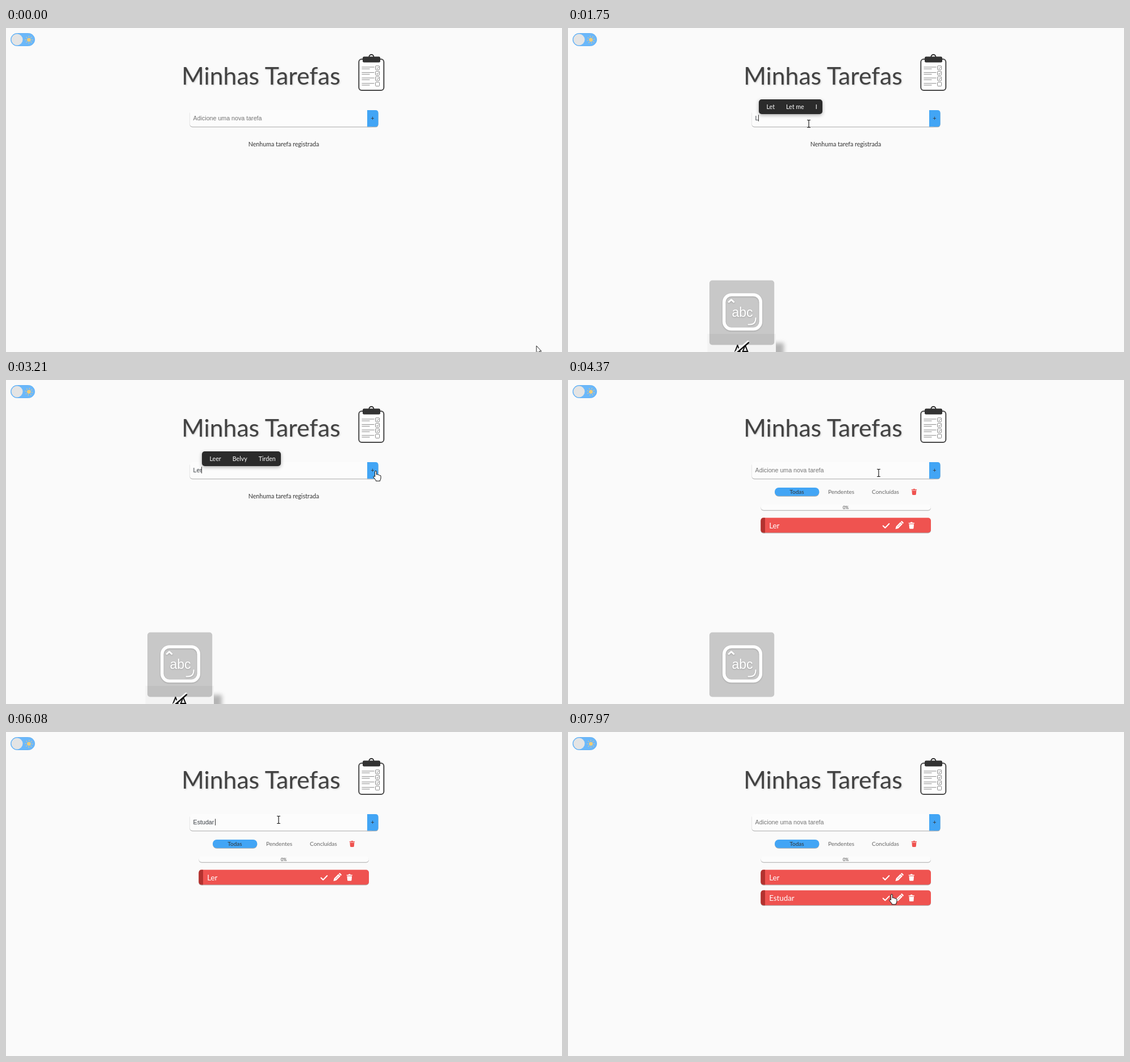
An HTML page that plays this animation: 979 by 572 pixels, repeating every 8000 ms.

```html
<!DOCTYPE html>
<html lang="pt">
<head>
<meta charset="utf-8">
<title>Minhas Tarefas</title>
<style>
  html, body { margin: 0; width: 100%; height: 100%; overflow: hidden; background: #fafafa; }
  svg { position: absolute; left: 0; top: 0; font-family: Lato, sans-serif; }
  .mid { text-anchor: middle; }
  .soft { filter: drop-shadow(.4px 1px .7px rgba(0,0,0,.32)); }
  .field { font: 10.67px "Liberation Sans", Arial, sans-serif; white-space: pre; }
  .tab { font-size: 10px; fill: #666; text-anchor: middle; }
  .name { font-size: 13.33px; fill: #fff; }
  .line { fill: none; stroke-linecap: round; stroke-linejoin: round; }
  #popup {
    position: absolute; top: 125.5px; height: 26px; padding: 0 9.5px 0 14px; border-radius: 5px;
    display: flex; gap: 20px; align-items: center; white-space: nowrap;
    background: #2b2b2b; color: #fff; font: 10.67px Lato, sans-serif;
    box-shadow: 0 2px 6px rgba(0,0,0,.32);
  }
</style>
</head>
<body>
<svg width="979" height="572" viewBox="0 0 979 572">
  <defs>
    <g id="trash">
      <path d="M-5-4.7h3l.8-1.3h2.4l.8 1.3h3v1.5h-10z"/>
      <path d="M-4.3-2.4h8.6l-.6 7.2q-.1 1.2-1.3 1.2h-4.8q-1.2 0-1.3-1.2z"/>
    </g>
    <g id="task">
      <g class="soft">
        <rect x="339.5" y="243.2" width="299.5" height="26.3" rx="5" fill="#ef5350"/>
        <path d="M347 243.2v26.3h-2.5q-5 0-5-5v-16.3q0-5 5-5z" fill="#b3322f"/>
      </g>
      <path class="line" d="M554.8 257.5l3.6 3.5 7-7.2" stroke="#fff" stroke-width="2"/>
      <g transform="translate(583 256.8) rotate(45)" fill="#fff">
        <path d="M-2.6-8.2q0-1 1-1h3.2q1 0 1 1v1.4h-5.2zM-2.6-5.8h5.2v10.5l-2.6 4.5-2.6-4.5z"/>
        <path d="M0-4v8" stroke="#ef5350" stroke-width=".8"/>
      </g>
      <use href="#trash" x="604.8" y="256.8" fill="#fff"/>
    </g>
  </defs>

  <rect x="8.5" y="9.5" width="42" height="22" rx="11" fill="#6bb8fa" stroke="#62b0f4"/>
  <circle cx="19.5" cy="20.5" r="10" fill="#e4e4e4"/>
  <g id="sun" fill="#f0cc78" stroke="#e3c68c" stroke-width="1.4"></g>

  <text class="mid" x="449" y="100.3" font-size="42.67" fill="#424242"
    style="text-shadow:1px 1px 3px rgba(0,0,0,.2)">Minhas Tarefas</text>

  <g id="clipboard">
    <rect x="621.3" y="55" width="44" height="55" rx="5" fill="#fff" stroke="#484848" stroke-width="2"/>
    <circle cx="643.4" cy="51" r="4" fill="none" stroke="#333" stroke-width="2"/>
    <rect x="628" y="50.5" width="31" height="10.3" rx="2.5" fill="#333"/>
  </g>

  <g class="soft">
    <rect x="323.5" y="145" width="325" height="29.3" rx="5" fill="#fcfcfc"/>
    <path d="M636 145h14.5q5 0 5 5v19.3q0 5-5 5H636z" fill="#42a5f5"/>
  </g>
  <text class="field mid" x="645.3" y="162.7" fill="#333">+</text>
  <text class="field" id="entry" x="329.6" y="162.8"></text>
  <path id="caret" d="M0 153.3v11.5" stroke="#333"/>

  <text id="empty" class="mid" x="489" y="209" font-size="10.67" fill="#333">Nenhuma tarefa registrada</text>

  <g id="list">
    <rect class="soft" x="364" y="190" width="78.3" height="14.8" rx="7" fill="#42a5f5"/>
    <text class="tab" x="403" y="201" style="fill:#333">Todas</text>
    <text class="tab" x="481" y="201">Pendentes</text>
    <text class="tab" x="559" y="201">Concluídas</text>
    <use href="#trash" transform="translate(609.4 197.4) scale(.92)" fill="#ef5350"/>
    <rect class="soft" x="339.5" y="219.8" width="299.5" height="10" rx="5" fill="#fcfcfc"/>
    <text class="mid" x="489" y="227.6" font-size="7.33" fill="#333">0%</text>
    <use href="#task"/>
    <text class="name" x="354.2" y="261.7">Ler</text>
    <g id="second" transform="translate(0 36.3)">
      <use href="#task"/>
      <text class="name" x="354.2" y="261.7">Estudar</text>
    </g>
  </g>

  <g id="lockPanel">
    <rect x="352" y="556" width="28" height="30" fill="#b4b4b4" style="filter:blur(3.5px)"/>
    <rect x="245.5" y="540" width="120.5" height="40" fill="#f3f3f3"/>
  </g>
  <g id="keyPanel">
    <rect x="249" y="445.5" width="114.2" height="114" rx="5" fill="#c8c8c8"/>
    <g class="line" stroke="#fff" style="filter:drop-shadow(0 1px 1px rgba(0,0,0,.2))">
      <rect x="274.8" y="471" width="64.5" height="60.5" rx="13" stroke-width="5.5"/>
      <path d="M282.3 484.5l5.2-4.8 5.2 4.8" stroke-width="3" stroke-linecap="butt"/>
      <path d="M317.5 523.5h3q10 0 10-11.5" stroke-width="2"/>
      <text class="mid" x="307" y="509.5" fill="#fff" stroke="none" font-size="23"
        font-family="Liberation Sans, Arial, sans-serif">abc</text>
    </g>
  </g>
  <g id="lockMark">
    <path d="M249 540h114.2v14.5q0 5-5 5H254q-5 0-5-5z" fill="#000" opacity=".04"/>
    <g class="line" stroke="#111" stroke-width="2">
      <path d="M292 577l6.5-17 6.5 17M294 571h9M305.500 577l6.5-17 6.5 17M307.500 571h9"/>
      <path d="M290 576.500l27-23.500" stroke="#f3f3f3" stroke-width="3"/>
      <path d="M291 579l27-23.5" stroke-width="2.400"/>
    </g>
  </g>
</svg>
<div id="popup"></div>
<svg width="979" height="572" viewBox="0 0 979 572">
  <g id="cursor" stroke-linejoin="round">
    <path id="arrow" d="M0 0v13.2l3-2.8 2.1 4.8 2-.9-2.1-4.6h3.8z" fill="#fff" stroke="#222"/>
    <path id="beam" d="M-3-6.5h2.2l.8.8.8-.8H3M0-5.7V5.7M-3 6.5h2.2l.8-.8.8.8H3" fill="none" stroke="#222" stroke-width="1.2"/>
    <path id="hand" d="M-1.4 9V1Q-1.4-.5 0-.5T1.4 1V6Q3.8 4.9 4.2 6.6 6.2 5.8 6.7 7.4 9 7 9 9v3q0 2.2-1.4 4v1.3H.3V16l-4-5q-1-2 .6-2.3 1 0 1.7 1.2z" fill="#fff" stroke="#111"/>
  </g>
</svg>

<script>
const LOOP = 8000;
const FIRST_ADD = 3500, SECOND_ADD = 7150;
const $ = id => document.getElementById(id);
const show = (id, on) => $(id).style.display = on ? '' : 'none';
const clamp01 = v => Math.max(0, Math.min(1, v));
const within = (v, from, to) => v >= from && v < to;

// Rays and checklist rows
let rays = '';
for (let i = 0; i < 8; i++) rays += `<path d="M0-5V-6.8" transform="rotate(${i * 45})"/>`;
$('sun').innerHTML = `<circle r="3.4" stroke="none"/>${rays}`;

let rows = '';
for (let i = 0; i < 4; i++) {
  rows += `<g transform="translate(0 ${70.3 + i * 9.6})" fill="none" stroke="#888">
    <path d="M626.5-1.3h22M626.5 1.8h14"/>
    <rect x="650.6" y="-3.5" width="7" height="7" rx="1"/>
    ${i < 3 ? '<path d="M652.3 0l1.5 1.5 2.5-3"/>' : ''}</g>`;
}
$('clipboard').insertAdjacentHTML('beforeend', rows);

// Text in the entry field: [time, text]
const keys = [[0, ''], [1450, 'L'], [1950, 'Le'], [2200, 'Ler'], [FIRST_ADD, '']];
[...'Estudar '].forEach((_, i, all) => keys.push([5080 + i * 80, all.slice(0, i + 1).join('')]));
keys.push([SECOND_ADD, '']);

const suggestions = {
  L: [335.5, 'Let', 'Let me', 'I'],
  Le: [340, 'Let', 'Let me', 'Less'],
  Ler: [344.5, 'Leer', 'Belvy', 'Tirden'],
};

// Pointer hotspot: [time, x, y]
const path = [
  [0, 934, 561], [80, 934, 561], [800, 424, 172], [1600, 424, 169], [2470, 424, 169],
  [2920, 674, 172], [3200, 651, 161], [4130, 651, 161], [4370, 547, 164], [4900, 455, 155],
  [5780, 455, 155], [6080, 479.5, 154.5], [6500, 683, 245], [7000, 641, 157],
  [7420, 641, 157], [7960, 570, 287], [LOOP, 570, 287],
];

function pointerAt(t) {
  const i = path.findIndex(p => p[0] > t);
  const [t0, x0, y0] = path[i - 1], [t1, x1, y1] = path[i];
  const p = (t - t0) / (t1 - t0), e = p * p * (3 - 2 * p);
  return [x0 + (x1 - x0) * e, y0 + (y1 - y0) * e];
}

function pointerKind(x, y, t) {
  if (within(y, 145, 175)) {
    if (within(x, 323, 636)) return 'beam';
    if (within(x, 636, 656)) return 'hand';
  }
  const overTask = within(y, 246, 267) || (t >= SECOND_ADD && within(y, 282, 303));
  return t >= FIRST_ADD && overTask && within(x, 550, 613) ? 'hand' : 'arrow';
}

let popupFor = null;
function drawPopup(text) {
  if (text === popupFor) return;
  popupFor = text;
  const found = suggestions[text];
  show('popup', found);
  if (!found) return;
  const [left, ...words] = found;
  $('popup').style.left = left + 'px';
  $('popup').innerHTML = words.map(w => `<span>${w}</span>`).join('');
}

function drawEntry(t) {
  const [since, text] = keys.filter(k => k[0] <= t).pop();
  const entry = $('entry');
  const shown = text || 'Adicione uma nova tarefa';
  if (entry.textContent !== shown) entry.textContent = shown;
  entry.setAttribute('fill', text ? '#3a3f45' : '#757575');

  const focused = within(t, 1000, 3450) || within(t, 4950, 6950);
  const blinkStart = Math.max(since, t < 4000 ? 1000 : 4950);
  show('caret', focused && (t - blinkStart) % 1000 < 500);
  const width = text ? entry.getComputedTextLength() : 0;
  $('caret').setAttribute('transform', `translate(${Math.round(329.6 + width) - .5} 0)`);
  drawPopup(text);
}

function draw(t) {
  $('sun').setAttribute('transform', `translate(40.3 20.8) rotate(${t * .045})`);
  drawEntry(t);

  show('empty', t < FIRST_ADD);
  show('list', t >= FIRST_ADD);
  show('second', t >= SECOND_ADD);

  show('keyPanel', within(t, 1560, 5600));
  $('keyPanel').style.opacity = 1 - clamp01((t - 4450) / 1100);
  const lockOn = within(t, 1680, 3650);
  show('lockPanel', lockOn);
  show('lockMark', lockOn);

  const [x, y] = pointerAt(t), kind = pointerKind(x, y, t);
  for (const id of ['arrow', 'beam', 'hand']) show(id, id === kind);
  $('cursor').setAttribute('transform', `translate(${Math.round(x)} ${Math.round(y)})`);
}

const start = performance.now();
function tick() {
  draw((performance.now() - start) % LOOP);
  requestAnimationFrame(tick);
}
tick();
</script>
</body>
</html>
```
